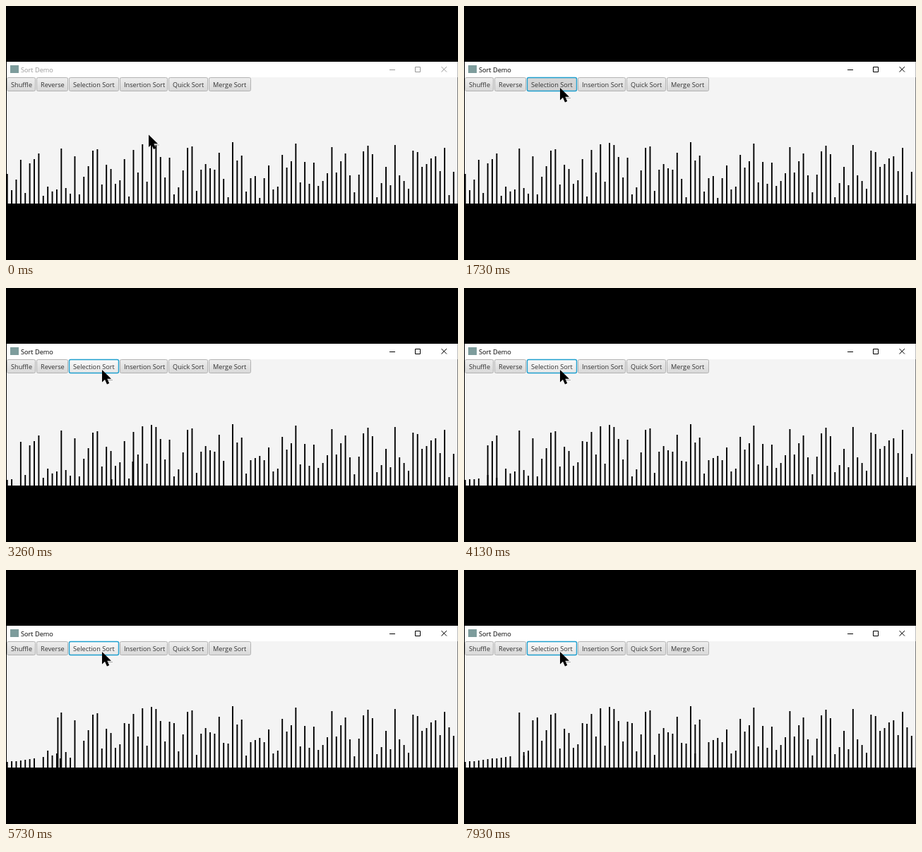
Recreate the animation shown at these times as an HTML page. Size 640x360 px, loop 8000 ms.

```html
<!DOCTYPE html>
<html lang="en">
<head>
<meta charset="utf-8">
<title>Sort Demo</title>
<style>
  html, body { margin: 0; width: 100%; height: 100%; overflow: hidden; background: #000; }
  svg { display: block; width: 640px; height: 360px; }
  text { font: 9.2px "Open Sans", "Noto Sans", sans-serif; fill: #333; }
  .chrome text { fill: #000; }
  .chrome path { fill: none; stroke: #000; }
  .inactive text { fill: #999; }
  .inactive path { stroke: #999; }
  .button rect { fill: url(#face); stroke: #b2b2b2; }
  .hover rect { fill: url(#hoverFace); }
  .pressed rect { fill: url(#pressedFace); }
  .focused rect { stroke: #1f9fce; stroke-width: 1.4; }
</style>
</head>
<body>
<svg viewBox="0 0 640 360">
  <defs>
    <linearGradient id="face" x2="0" y2="1">
      <stop stop-color="#eee"/><stop offset="1" stop-color="#d8d8d8"/>
    </linearGradient>
    <linearGradient id="hoverFace" x2="0" y2="1">
      <stop stop-color="#fafafa"/><stop offset="1" stop-color="#e6e6e6"/>
    </linearGradient>
    <linearGradient id="pressedFace" x2="0" y2="1">
      <stop stop-color="#d6d6d6"/><stop offset="1" stop-color="#d0d0d0"/>
    </linearGradient>
  </defs>
  <rect width="640" height="360"/>
  <rect x="1" y="79" width="638.5" height="201" fill="#f4f4f4"/>
  <rect x="1" y="79" width="638.5" height="22" fill="#fff"/>
  <g id="chrome">
    <rect x="6" y="84" width="12" height="11" fill="#7d9c9c"/>
    <text x="21" y="93.5">Sort Demo</text>
    <path d="M543 90.5h8M579.5 86.5h7v7h-7zM616.5 86l7.5 7.5M624 86l-7.5 7.5"/>
  </g>
  <g id="buttons"></g>
  <g id="bars"></g>
  <g id="cursor">
    <path d="M7 14.5h8" stroke="#aaa"/>
    <path d="M0 0V17.5L4 13.8L7 20.5L10.2 19L7.3 12.7H13Z"/>
  </g>
</svg>
<script>
const LOOP = 8000, FRAME = 1000 / 15;
const MOVE_START = 60, MOVE_END = 1260, PRESS = 1730, RELEASE = 1800;
const SORT_START = 1993, SWAP_TIME = 500.5;
const BASE = 280, FIRST_X = 0.75, PITCH = 6.385, BAR_WIDTH = 1.9;

const heights = [
  42, 19, 34, 62, 15, 57, 63, 71, 11, 24, 17.2, 20, 78, 22, 14, 67, 13, 38, 53, 75,
  77, 27, 55, 49, 28, 33, 63, 10, 76, 44, 84, 31, 86, 83, 66, 37, 65, 13, 23, 47,
  79, 81, 18, 48, 56, 50, 48, 72, 35, 9, 87, 61, 68, 17, 36, 39, 8, 36, 54, 20,
  24, 69, 51, 60, 85, 30, 59, 28, 58, 25, 32, 43, 80, 44, 60, 71, 40, 16, 41, 74,
  82, 70, 9, 29, 52, 26, 83, 40, 32, 21, 75, 73, 52, 56, 64, 67, 46, 79, 12, 45
];
const buttonSpecs = [
  ["Shuffle", 1, 42], ["Reverse", 43, 88], ["Selection Sort", 89, 160],
  ["Insertion Sort", 161, 229], ["Quick Sort", 230, 286], ["Merge Sort", 287, 347]
];

const byId = id => document.getElementById(id);
function add(parent, tag, attributes) {
  const node = document.createElementNS("http://www.w3.org/2000/svg", tag);
  for (const name in attributes) node.setAttribute(name, attributes[name]);
  return parent.appendChild(node);
}

const buttons = buttonSpecs.map(([label, left, right]) => {
  const group = add(byId("buttons"), "g", { class: "button" });
  add(group, "rect", { x: left + 0.5, y: 101.5, width: right - left - 1, height: 19, rx: 2 });
  add(group, "text", { x: left + 6, y: 115 }).textContent = label;
  return group;
});
const sortButton = buttons[2];

const bars = heights.map(height =>
  add(byId("bars"), "rect", { y: BASE - height, width: BAR_WIDTH, height }));

// Selection sort: the last of equal minima is chosen.
function planSwaps(count) {
  const order = heights.map((_, i) => i);
  return Array.from({ length: count }, (_, i) => {
    let min = i;
    for (let j = i + 1; j < order.length; j++) {
      if (heights[order[j]] <= heights[order[min]]) min = j;
    }
    [order[i], order[min]] = [order[min], order[i]];
    return min;
  });
}
const swaps = planSwaps(Math.ceil((LOOP - SORT_START) / SWAP_TIME));

const clamp = v => Math.max(0, Math.min(1, v));
const smooth = p => p * p * (3 - 2 * p);

// Accelerates over the first fifth, slows down over the last.
function easeBoth(p) {
  if (p < 0.2) return 25 / 9 * p * p;
  if (p > 0.8) return 1 - 25 / 9 * (1 - p) ** 2;
  return (10 * p - 0.5) / 9;
}

function drawBars(time) {
  const progress = Math.max(0, (time - SORT_START) / SWAP_TIME);
  const step = Math.floor(progress);
  const order = heights.map((_, i) => i);
  for (let i = 0; i < step; i++) {
    const j = swaps[i];
    [order[i], order[j]] = [order[j], order[i]];
  }
  const target = swaps[step];
  const shift = (target - step) * easeBoth(progress - step);
  order.forEach((bar, slot) => {
    let place = slot;
    if (slot === step) place += shift;
    else if (slot === target) place -= shift;
    bars[bar].setAttribute("x", FIRST_X + PITCH * place);
  });
}

function drawPointer(time) {
  const p = smooth(clamp((time - MOVE_START) / (MOVE_END - MOVE_START)));
  const x = 202 - 66 * p, y = 182.5 - 66.5 * p;
  byId("cursor").setAttribute("transform", `translate(${x} ${y})`);
  const active = time >= PRESS;
  const pressed = active && time < RELEASE;
  byId("chrome").setAttribute("class", active ? "chrome" : "chrome inactive");
  sortButton.setAttribute("class", "button" + (y < 121 ? " hover" : "") +
    (pressed ? " pressed" : "") + (active ? " focused" : ""));
}

function render(now) {
  const time = Math.floor((now % LOOP + 7) / FRAME) * FRAME % LOOP;
  drawBars(time);
  drawPointer(time);
}

const start = performance.now();
function tick() {
  render(performance.now() - start);
  requestAnimationFrame(tick);
}
tick();
</script>
</body>
</html>
```
